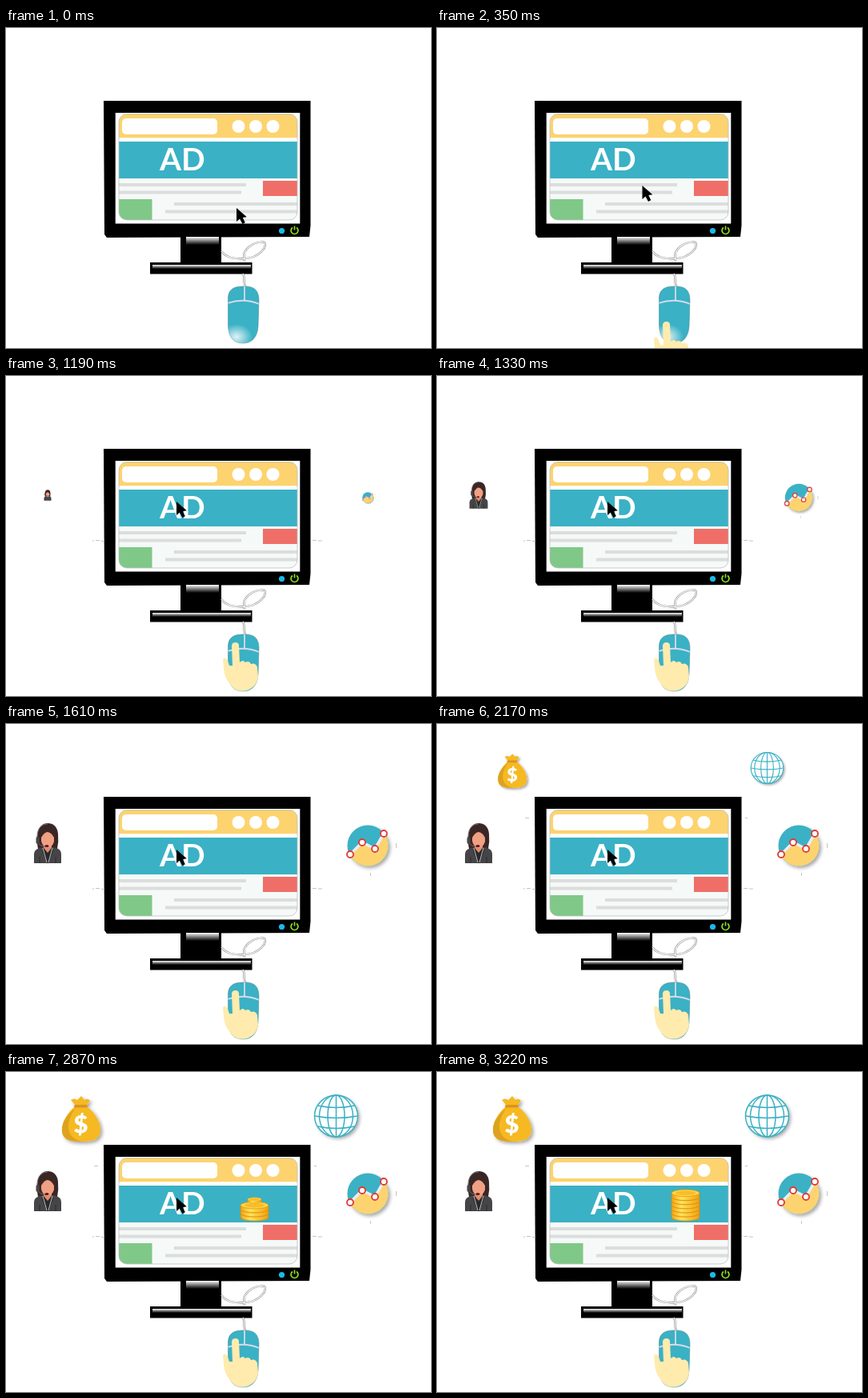
An HTML page that plays this animation: 531x400 px, repeating every 3.5 s.

```html
<!DOCTYPE html>
<html lang="en">
<head>
<meta charset="utf-8">
<title>Online advertising</title>
<style>
  html, body { margin: 0; width: 100%; height: 100%; overflow: hidden; background: #fff; }
  svg { display: block; width: 531px; height: 400px; }
  .ad { font: 700 39px Lato, sans-serif; fill: #fff; }
  .dollar { font: 900 31px Lato, sans-serif; fill: #fff; text-anchor: middle; }
  .line { fill: #dcdddd; }
  .tick { stroke: #c4c4c4; stroke-width: 1; fill: none; }
  .globe { fill: none; stroke: #3ab1c5; stroke-width: 1.5; }
</style>
</head>
<body>
<svg viewBox="0 0 531 400">
  <defs>
    <linearGradient id="shine" x2="0" y2="1">
      <stop offset="0" stop-color="#fff"/>
      <stop offset="1" stop-color="#000"/>
    </linearGradient>
    <linearGradient id="gold">
      <stop offset="0" stop-color="#f2a512"/>
      <stop offset=".35" stop-color="#ffe45c"/>
      <stop offset="1" stop-color="#f0a00e"/>
    </linearGradient>
    <radialGradient id="gloss">
      <stop offset="0" stop-color="#fff" stop-opacity=".85"/>
      <stop offset="1" stop-color="#fff" stop-opacity="0"/>
    </radialGradient>
    <filter id="shadow" x="-30%" y="-30%" width="170%" height="170%">
      <feDropShadow dx="2.500" dy="2.500" stdDeviation="2" flood-opacity=".35"/>
    </filter>
    <clipPath id="page"><rect x="141" y="107.500" width="223" height="132.500" rx="10"/></clipPath>
    <clipPath id="disc"><circle r="25.500"/></clipPath>
    <path id="mouseBody" d="M277.500 340C277 327 284 323 296 323C309 322 316 327 316 340L315 373C314 387 307 394 296 394C284 394 277.500 386 277.500 371Z"/>
    <clipPath id="mouseClip"><use href="#mouseBody"/></clipPath>
    <path id="cable" d="M269 279C276 288 286 289 301 288C316 286 324 276 324 270C323 265 309 268 302 275C296 281 297 286 298 292M296 307C299 312 296 318 299 323"/>
    <g id="coin">
      <path d="M-17.300 0V5A17.300 4.300 0 0 0 17.300 5V0Z" fill="url(#gold)" stroke="#dd8b0a" stroke-width=".8"/>
      <ellipse rx="17.300" ry="4.300" fill="#ffd94a" stroke="#e2960c" stroke-width=".8"/>
      <ellipse rx="13" ry="2.800" fill="#f9bd2a"/>
    </g>
  </defs>

  <!-- Monitor -->
  <path d="M122 91H380.500V247L379 261L126 262L123 258Z"/>
  <path d="M136.700 106H367.300V244.500H136.700Z" fill="#fff"/>
  <g clip-path="url(#page)">
    <path d="M141 107H364V240H141Z" fill="#f5f9f8"/>
    <path d="M141 107H364V137.500H141Z" fill="#fdd36f"/>
    <path d="M141 137.500H364V142H141Z" fill="#fff"/>
    <path d="M141 142H364V188H141Z" fill="#3ab1c5"/>
    <rect x="145" y="113" width="119" height="20" rx="5" fill="#fff"/>
    <g fill="#fff"><circle cx="290.500" cy="123" r="8"/><circle cx="312" cy="123" r="8"/><circle cx="333.500" cy="123" r="8"/></g>
    <path class="line" d="M141 194H300V198H141ZM141 203.500H294V207.500H141ZM210 218H364V222H210ZM199 227.500H364V231.500H199Z"/>
    <path d="M321 191H364V210H321Z" fill="#ef6f68"/>
    <path d="M141 214H182.500V240H141Z" fill="#80c888"/>
  </g>
  <rect x="141" y="107.500" width="223" height="132.500" rx="10" fill="none" stroke="#b9c0c0" stroke-width=".8"/>
  <text class="ad" x="192" y="178">AD</text>
  <circle cx="344.500" cy="253.500" r="3.600" fill="#1cb8ec"/>
  <path d="M358 249.500A4.400 4.400 0 1 0 363 249.500M360.500 247.500V252.500" fill="none" stroke="#8be01c" stroke-width="1.700"/>
  <path d="M218 260H269V294H218ZM180 293H307.500V307.500H180Z"/>
  <path d="M225 261H266V271H225Z" fill="url(#shine)"/>
  <path d="M183 296H306V301H183Z" fill="url(#shine)"/>

  <!-- Cable and mouse -->
  <g fill="none">
    <use href="#cable" stroke="#666" stroke-width="2.200"/>
    <use href="#cable" stroke="#fafafa" stroke-width="1.300"/>
  </g>
  <use href="#mouseBody" fill="#3ab1c5" stroke="#4d7f88" stroke-width=".5"/>
  <g clip-path="url(#mouseClip)">
    <ellipse cx="288" cy="386" rx="20" ry="16" fill="url(#gloss)"/>
    <path d="M277 344Q297 337 316 345M298 323V340" fill="none" stroke="#d5dcea" stroke-width="1.800"/>
  </g>
  <path id="hand" d="M282 337Q282.500 333 286.500 333Q291 333 291 337L292 358Q296 354 299 358Q304 355 306 360Q312 358 314 364L315 376Q313 390 299 393.500H291Q283 391 279 384Q273 377 272 366L271 354Q274 350 277 356L279 362L283 362Z" fill="#ffebad"/>

  <!-- Connector ticks -->
  <path id="lowTicks" class="tick" d="M108 206H110M112 205.500H117M119 206.500H123M383 205.500H388M390 206H395"/>
  <path id="highTicks" class="tick" d="M110 117.500H115M385 117.500H388"/>

  <!-- Support agent -->
  <g id="agent">
    <path d="M-12 7Q-14 -2 -12.500 -12C-11 -21 -6 -25 0 -25C7 -25 12 -21 13 -12Q14 -2 12 7Z" fill="#3a2725"/>
    <path d="M-17 25V14C-17 8 -12 6 -5 5H6C13 6 17 8 17 14V25Z" fill="#454548"/>
    <path d="M-5 3H5V6L0 14L-5 6Z" fill="#e08a6c"/>
    <path d="M-5 6L0 12L5 6L7 9L1 25H-1L-7 9Z" fill="#29292c"/>
    <path d="M-6 6L-1 24M6 6L1 24" stroke="#d0d0d2" stroke-width=".9"/>
    <path d="M-8 -7Q-4 -14 0 -14Q5 -13 8 -7V-2Q6 5 0 6Q-7 4 -8 -3Z" fill="#f0a083"/>
    <path d="M-13 -4C-14 -17 -9 -24 0 -24M-12 -1Q-10 4 -2 4" fill="none" stroke="#77706f"/>
    <rect x="-14.500" y="-8" width="4" height="9" rx="2" fill="#4b4747"/>
    <ellipse cx="-1" cy="3.500" rx="2.600" ry="1.500" fill="#5d1618"/>
    <path d="M-10 17V25M10 17V25" stroke="#2c2c2f"/>
  </g>

  <!-- Growth chart -->
  <g id="chart">
    <g filter="url(#shadow)">
      <circle r="25.500" fill="#3ab1c5"/>
      <path d="M-26 14L-22 11L-7 -4L9 4L20 -15L26 -18V26H-26Z" fill="#fdd36f" clip-path="url(#disc)"/>
    </g>
    <path d="M-22 11L-7 -4L9 4L20 -15" fill="none" stroke="#e9edf0" stroke-width="3.500"/>
    <g fill="#fff" stroke="#e03a35" stroke-width="1.800">
      <circle cx="-22" cy="11" r="4"/><circle cx="-7" cy="-4" r="4"/><circle cx="9" cy="4" r="4"/><circle cx="20" cy="-15" r="4"/>
    </g>
    <path class="tick" d="M35.500 -3V3M3.500 34V38"/>
  </g>

  <!-- Money bag -->
  <g id="bag">
    <path filter="url(#shadow)" d="M-8 -17L-14 -24Q-10 -27 -6 -24L-1 -29L3 -24Q7 -27 10 -23L5 -17C15 -9 23 2 23 13C23 24 16 28 -1 28C-18 28 -25 24 -25 13C-25 2 -17 -9 -8 -17Z" fill="#f6b921"/>
    <path d="M-8 -14C-17 -7 -25 2 -25 13C-25 24 -18 28 -1 28C-14 24 -18 16 -17 6Q-15 -5 -8 -14Z" fill="#dda21f"/>
    <rect x="-10" y="-18" width="17" height="3.500" rx="1.700" fill="#db9420"/>
    <text class="dollar" x="-1.500" y="17">$</text>
  </g>

  <!-- Globe -->
  <g id="globe">
    <ellipse rx="27" ry="26" fill="#fff" filter="url(#shadow)"/>
    <g class="globe">
      <ellipse rx="27" ry="26"/><ellipse rx="21" ry="26"/><ellipse rx="10.500" ry="26"/>
      <path d="M0 -26V26M-23 -13Q0 -8 23 -13M-27 0Q0 5 27 0M-23 13Q0 18 23 13"/>
    </g>
  </g>

  <g id="coins"></g>
  <path id="cursor" d="M0 0V17L4 13.500L7.500 20L10.800 18.300L7.800 12L12.800 11.200Z"/>
</svg>

<script>
const LOOP = 3500, TICK = 70;
const el = id => document.getElementById(id);
const show = (node, on) => node.setAttribute('visibility', on ? 'visible' : 'hidden');
const place = (node, x, y, scale = 1) =>
  node.setAttribute('transform', `translate(${x} ${y}) scale(${scale})`);

// Number of steps already taken in a run that changes the picture every tick.
const stepsSince = (t, start, count) =>
  Math.max(0, Math.min(count, Math.floor((t - start) / TICK) + 1));

const icons = [
  { id: 'agent', x: 52, y: 149, start: 1190, steps: 7 },
  { id: 'chart', x: 452, y: 152, start: 1190, steps: 7 },
  { id: 'bag', x: 95, y: 59, start: 2030, steps: 6 },
  { id: 'globe', x: 412.5, y: 55, start: 2030, steps: 6 }
];

const COIN = { x: 310.5, floor: 176.8, gap: 5.1, max: 6 };
const coins = Array.from({ length: COIN.max }, () => {
  const coin = document.createElementNS('http://www.w3.org/2000/svg', 'use');
  coin.setAttribute('href', '#coin');
  return el('coins').appendChild(coin);
});

function drawCoins(t) {
  const step = stepsSince(t, 2590, 10);
  const landed = step < 2 ? 0 : Math.floor(step / 2) + 1;
  const dropping = step % 2 === 1;
  coins.forEach((coin, i) => {
    const small = dropping && i === landed;
    show(coin, i < landed || small);
    const y = COIN.floor - i * COIN.gap;
    place(coin, COIN.x, small ? y - 2.5 : y, small ? 0.5 : 1);
  });
}

function render(t) {
  const move = stepsSince(t, 140, 8) / 8;
  if (t < 700) place(el('cursor'), 288 - 63 * move, 225 - 56 * move);
  else place(el('cursor'), 213, 157);
  show(el('hand'), move > 0);
  place(el('hand'), 0, 68 * (1 - move));

  show(el('lowTicks'), t >= 840);
  show(el('highTicks'), t >= 1750);

  for (const { id, x, y, start, steps } of icons) {
    const p = stepsSince(t, start, steps) / steps;
    show(el(id), p > 0);
    place(el(id), x, y, 1 - (1 - p) ** 2);
  }
  drawCoins(t);
}

const begin = performance.now();
function frame() {
  render((performance.now() - begin) % LOOP);
  requestAnimationFrame(frame);
}
frame();
</script>
</body>
</html>
```
